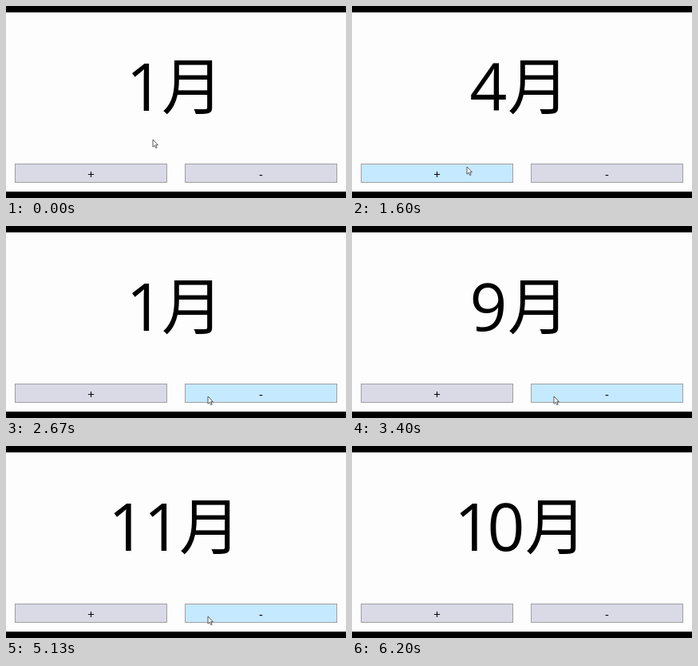
These frames come from a looping animation (426 px wide and 240 px high, 6270 ms). An HTML page:

```html
<!DOCTYPE html>
<html lang="ja">
<head>
<meta charset="utf-8">
<title>Month counter</title>
<style>
  html, body { margin: 0; width: 100%; height: 100%; overflow: hidden; background: #000; }
  svg { display: block; width: 100%; height: 100%; }
  text { text-anchor: middle; }
  .digit { font: 82px "Open Sans", "Noto Sans", sans-serif; }
  .unit { font: 300 77px "Noto Sans CJK JP", "Noto Sans CJK", sans-serif; text-anchor: start; }
  .label { font: 15px "Open Sans", "Noto Sans", sans-serif; }
  .button { stroke: #a0a0a4; }
</style>
</head>
<body>
<svg viewBox="0 0 426 240">
  <rect width="426" height="240"/>
  <rect y="8" width="426" height="224" fill="#fdfdfd"/>
  <g id="month">
    <text class="digit" id="tens" y="131"></text>
    <text class="digit" id="ones" y="131"></text>
    <text class="unit" id="unit" y="129">月</text>
  </g>
  <rect class="button" id="plus" x="11.5" y="197.5" width="190" height="23"/>
  <rect class="button" id="minus" x="224.5" y="197.5" width="190" height="23"/>
  <text class="label" x="106.5" y="216">+</text>
  <text class="label" x="319.5" y="216">-</text>
  <path id="cursor" d="M0 0V9.2L2.2 7.3L3.7 10.6L5.2 9.9L3.7 6.7H6.4Z"
        fill="#fff" stroke="#333" stroke-width=".8"/>
</svg>
<script>
const LOOP = 6270, STEP = 1000 / 15;
const $ = id => document.getElementById(id);

// Click times and the change each one makes.
const clicks = [
  [530, 1], [1000, 1], [1400, 1],
  ...[2270, 2430, 2600].map(t => [t, -1]),
  ...Array.from({ length: 8 }, (_, i) => [2800 + i * 190, -1]),
  ...Array.from({ length: 7 }, (_, i) => [4300 + i * 160, -1])
];

// Cursor stops: time, x, y.
const stops = [
  [0, 184, 167], [70, 184, 167], [400, 144, 201], [1730, 144, 201],
  [2130, 253, 213], [5600, 253, 213], [5870, 262, 246], [LOOP, 262, 246]
];

function cursorAt(t) {
  const i = stops.findIndex(s => s[0] > t);
  const [t0, x0, y0] = stops[i - 1], [t1, x1, y1] = stops[i];
  const p = (t - t0) / (t1 - t0), e = p * p * (3 - 2 * p);
  return [x0 + (x1 - x0) * e, y0 + (y1 - y0) * e];
}

function monthAt(t) {
  const sum = clicks.reduce((n, [time, d]) => n + (time <= t ? d : 0), 0);
  return ((sum % 12) + 12) % 12 + 1;
}

function setDigit(id, char, x) {
  $(id).textContent = char;
  $(id).setAttribute("x", x + (char === "1" ? 3 : 0));
}

function setHover(id, left, x, y) {
  const over = x >= left && x <= left + 191 && y >= 197 && y <= 221;
  $(id).setAttribute("fill", over ? "#c5e9fe" : "#dad9e6");
}

function draw(ms) {
  const t = Math.floor((ms % LOOP + 4) / STEP) * STEP;
  const month = monthAt(t), wide = month > 9, shift = wide ? 22 : 0;
  setDigit("tens", wide ? "1" : "", 148.5);
  setDigit("ones", String(month % 10), 171 + shift);
  $("unit").setAttribute("x", 195 + shift);

  const [x, y] = cursorAt(Math.min(t, LOOP - 1));
  setHover("plus", 11, x, y);
  setHover("minus", 224, x, y);
  $("cursor").setAttribute("transform", `translate(${x} ${y})`);
  $("cursor").setAttribute("visibility", y < 232 ? "visible" : "hidden");
}

const start = performance.now();
function tick() {
  draw(performance.now() - start);
  requestAnimationFrame(tick);
}
tick();
</script>
</body>
</html>
```
